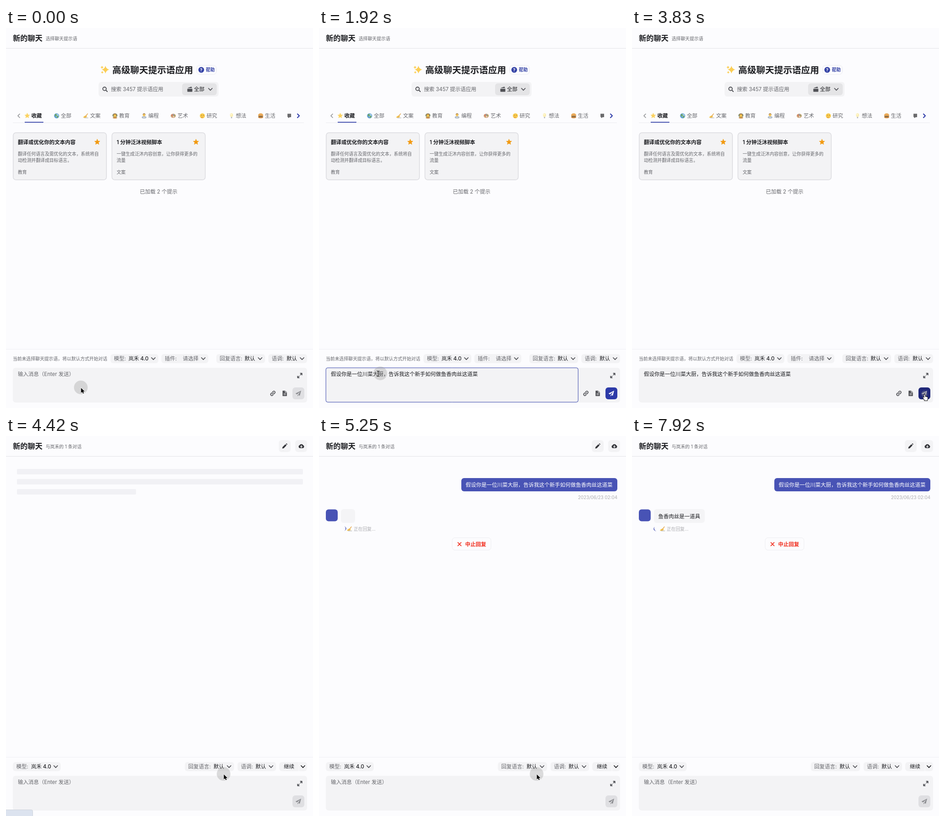
An HTML page with a canvas for the animation above (8000 ms loop, 673x831 px).

```html
<!DOCTYPE html>
<html lang="zh-CN">
<head>
<meta charset="utf-8">
<title>新的聊天</title>
<style>
html, body { margin: 0; width: 100%; height: 100%; overflow: hidden; background: #fcfcfe; }
canvas { display: block; width: 673px; height: 831px; }
</style>
</head>
<body>
<canvas id="stage"></canvas>
<script>
const W = 673, H = 831, LOOP = 8000, STEP = 1000 / 12;
const BG = '#fcfcfe', PANEL = '#f3f3f5', INK = '#1c1d21', GRAY = '#66676c', PALE = '#acacb0';
const BLUE = '#2c3aa8', INDIGO = '#4853b5', ICON = '#505156';
const BODY = 11.5, SMALL = 9.87;
const FONT = 'Inter, "Noto Sans CJK SC", "Noto Sans CJK", sans-serif';
const QUESTION = '假设你是一位川菜大厨，告诉我这个新手如何做鱼香肉丝这道菜';
const ANSWER = '鱼香肉丝是一道具';
const MODEL = '岚禾', INPUT_METHOD = '墨棠拼音', VIDEO_APP = '泛沐';

const canvas = document.getElementById('stage'), c = canvas.getContext('2d');
const dpr = window.devicePixelRatio || 1;
canvas.width = W * dpr;
canvas.height = H * dpr;

// Drawing helpers; text is centred vertically on y
function text(s, x, y, size = BODY, color = GRAY, weight = 400, align = 'left') {
  c.font = `${weight} ${size}px ${FONT}`;
  c.textAlign = align;
  c.fillStyle = color;
  c.fillText(s, x, y + size * 0.38);
}
function box(x, y, w, h, fill, r = 6, border, line = 1) {
  c.beginPath();
  c.roundRect(x, y, w, h, r);
  if (fill) { c.fillStyle = fill; c.fill(); }
  if (border) { c.strokeStyle = border; c.lineWidth = line; c.stroke(); }
}
function disc(x, y, rx, color, ry = rx) {
  c.beginPath();
  c.ellipse(x, y, rx, ry, 0, 0, 7);
  c.fillStyle = color;
  c.fill();
}
function shape(d, x, y, fill, stroke, width = 1.6, turn = 0) {
  const path = new Path2D(d);
  c.save();
  c.translate(x, y);
  c.rotate(turn);
  c.lineCap = c.lineJoin = 'round';
  c.lineWidth = width;
  if (stroke) { c.strokeStyle = stroke; c.stroke(path); }
  if (fill) { c.fillStyle = fill; c.fill(path); }
  c.restore();
}
const rule = (x, y, w, color) => { c.fillStyle = color; c.fillRect(x, y, w, 1); };
const chevron = (x, y, color = ICON) => shape('M-4 -2L0 2.2L4 -2', x, y, null, color, 1.8);
function star(x, y, r, color) {
  let d = '';
  for (let i = 0; i < 10; i++) {
    const a = i * Math.PI / 5, k = i % 2 ? r * 0.45 : r;
    d += `${i ? 'L' : 'M'}${k * Math.sin(a)} ${-k * Math.cos(a)}`;
  }
  shape(d + 'Z', x, y, color, color, 0.8);
}
function sparkle(x, y, r) {
  const q = r * 0.18;
  shape(`M0 ${-r}Q${q} ${-q} ${r} 0Q${q} ${q} 0 ${r}Q${-q} ${q} ${-r} 0Q${-q} ${-q} 0 ${-r}Z`, x, y, '#fbce55');
}
function pen(x, y) {
  shape('M-5.5 3Q-3 -1 1 -.5L3 2Q1 4.5 -5.5 4.2Z', x, y, '#f6cb58');
  shape('M-2 3L4 -4.5', x, y, null, '#e5a851', 1.5);
  shape('M-3 4.6H5', x, y, null, '#8a8a88', 0.7);
}

// Each tab emoji: ellipses as colour, dx, dy, rx, ry
const tabs = [
  ['全部', ['#5f9fd0', 0, 0, 5.6, 5.6], ['#9cc7e6', 1.2, -0.8, 3.4, 3.8], ['#6fa563', -1.8, -1.5, 2.2, 2.6], ['#6fa563', 2, 2, 1.8, 2.2]],
  ['文案'],
  ['教育', ['#8a9474', 0, -1, 5.6, 4.3], ['#a2703f', 0, -1.5, 3.2, 3.2], ['#f5c653', 0, -0.3, 2.7, 3], ['#c98f4a', 0, 4.3, 4.8, 1.7]],
  ['编程', ['#a37a4a', 0, -2.5, 2.9, 2.9], ['#f5c95f', 0, -1.4, 2.5, 2.7], ['#8fa6bd', 0, 3.5, 4.9, 2.4], ['#c9cdd2', 0, 3.5, 3.5, 2]],
  ['艺术', ['#cfa075', 0, 0, 5.6, 4.5], ['#d65f55', -2.6, -1.4, 1.2, 1.2], ['#5f98cf', 0.4, -2.4, 1.2, 1.2], ['#74ad69', 3, -0.6, 1.2, 1.2], ['#fcfcfe', 1, 2, 1.3, 1]],
  ['研究', ['#f9cc50', 0, 0, 5.6, 5.6], ['#8a602c', -2, -1.2, 0.7, 0.9], ['#8a602c', 2, -1.2, 0.7, 0.9], ['#e8ab45', -1, 3.4, 2.6, 1.3]],
  ['想法', ['#fbeeb2', 0, -1.6, 3.4, 3.9], ['#fef8da', -0.8, -2.4, 1.5, 1.7], ['#b5b5b6', 0, 3.8, 1.5, 1.6]],
  ['生活', ['#e9ab59', 0, -1.7, 5.5, 3.7], ['#dd9b4e', 0, 3.3, 5.3, 2.2], ['#d9654a', 0, 0.4, 5.5, 0.9], ['#83ad55', 0, 1.1, 5.6, 0.8], ['#8a5636', 0, 2.2, 5.2, 1]],
];

function selector(x, w, label, value, valueX, muted) {
  box(x, 713, w, 20, PANEL);
  text(label, x + 7.5, 723);
  text(value, valueX, 723, BODY, muted ? GRAY : INK, muted ? 400 : 500);
  chevron(x + w - 11, 723);
}

function card(x, title, lines, tag) {
  box(x + 0.75, 229, 204.5, 103, PANEL, 6, '#dcdce0', 1.5);
  text(title, x + 11, 249.5, BODY, INK, 600);
  star(x + 185, 249.5, 6.2, '#f29a11');
  lines.forEach((s, i) => text(s, x + 11, 275.5 + i * 13.3, SMALL));
  text(tag, x + 11, 315, SMALL);
}

function header(subtitle) {
  text('新的聊天', 15, 22, 16.3, INK, 600);
  text(subtitle, 87, 23, SMALL);
  rule(0, 44, W, '#e4e4e8');
  rule(0, 702, W, '#f0f0f4');
}

function homePage() {
  header('选择聊天提示语');
  sparkle(218, 91, 8.5);
  sparkle(210.5, 86, 3.4);
  sparkle(211, 97, 3);
  text('高级聊天提示语应用', 233, 91.5, 19.7, INK, 600);
  box(417.5, 81.5, 44, 20, BG, 7, '#ececf0');
  disc(428, 91.5, 6.3, '#3543a6');
  text('?', 428, 91.5, 9.5, '#fff', 700, 'center');
  text('帮助', 438, 91.5, SMALL, '#3543a6', 600);

  box(203, 118, 263, 32, PANEL);
  shape('M2.8 -1a3.8 3.8 0 1 1-7.6 0a3.8 3.8 0 1 1 7.6 0M1.9 2L5 5', 217, 134, null, ICON, 1.9);
  text('搜索 3457 提示语应用', 230, 134);
  box(386, 121, 76, 26, '#e4e4e6');
  shape('M-5.5 -1H5.5V4.5Q5.5 5.5 4.5 5.5H-4.5Q-5.5 5.5 -5.5 4.5ZM-5 -2.4L-3.5 -3.6L3.5 -5.8L5 -2.4Z', 403, 134, ICON);
  text('全部', 412, 134, BODY, INK, 500);
  chevron(448, 134);

  rule(15, 206.6, 638, '#eaeaef');
  shape('M2 -4L-2 0L2 4', 28, 192, null, '#88898d', 1.5);
  shape('M-2 -4L2 0L-2 4', 641, 192, null, BLUE, 2.1);
  star(46.5, 192, 5.6, '#fbd25f');
  text('收藏', 55.5, 192, BODY, INK, 600);
  box(41, 205.2, 41, 1.8, '#3644aa', 0);
  tabs.forEach(([name, ...blobs], i) => {
    const x = 111 + i * 63.9;
    if (!blobs.length) pen(x, 192);
    for (const [color, dx, dy, rx, ry] of blobs) disc(x + dx, 192 + dy, rx, color, ry);
    text(name, x + 9.3, 192);
  });
  shape('M-4 -4.5H4V3H1L-2 5L-3 2.5H-4Z', 621, 192, '#6b6b6d');

  card(15, '翻译或优化你的文本内容', ['翻译任何语言及需优化的文本，系统将自', '动检测并翻译成目标语言。'], '教育');
  card(231.5, `1 分钟${VIDEO_APP}视频脚本`, [`一键生成${VIDEO_APP}内容创意，让你获得更多的`, '流量'], '文案');
  text('已加载 2 个提示', 334.5, 358, BODY, GRAY, 400, 'center');

  text('当前未选择聊天提示语，将以默认方式开始对话', 15, 723, SMALL);
  selector(229, 105, '模型:', MODEL + ' 4.0', 268.5);
  selector(340.5, 103, '插件:', '请选择', 387.5, true);
  selector(461, 107, '回复语言:', '默认', 523);
  selector(575, 85, '语调:', '默认', 615);
}

function chatPage(t) {
  header(`与${MODEL}的 1 条对话`);
  box(598, 9, 26, 26, PANEL);
  shape('M-5.5 5.5L-4.7 2L1.5 -4L4 -1.5L-2 4.7ZM2.4 -4.9L3.5 -5.8Q4.3 -6 5 -5.2Q6 -4.2 5.5 -3.5L4.8 -2.5Z', 611, 22, '#34353a');
  box(634, 9, 26, 26, PANEL);
  shape('M-3.2 4.5a3.3 3.3 0 0 1-.6-6.4a4.2 4.2 0 0 1 7.6 0a3.3 3.3 0 0 1-.6 6.4Z', 647.5, 22, '#34353a');
  shape('M0 -1.5V2.6M-1.9 .9L0 2.8L1.9 .9', 647.5, 22, null, PANEL, 1.3);

  selector(15, 105, '模型:', MODEL + ' 4.0', 55);
  selector(392, 108, '回复语言:', '默认', 455);
  selector(507.5, 84.5, '语调:', '默认', 547);
  box(599, 713, 61, 20, PANEL);
  text('继续', 609, 723, BODY, INK, 500);
  box(641.5, 713, 1, 20, BG, 0);
  chevron(651, 723, INK);

  const shown = Math.min(1, Math.max(0, (t - 4550) / 320));
  c.globalAlpha = 1 - shown;
  if (shown < 1) [627, 627, 261].forEach((w, i) => box(24, 72 + i * 22, w, 12, '#f1f1f5', 2));
  c.globalAlpha = shown;
  messages(t);
  c.globalAlpha = 1;
}

function messages(t) {
  box(312, 92, 342, 29, INDIGO);
  text(QUESTION, 321.5, 106.5, BODY, '#fff');
  text('2023/06/23 02:04', 654, 134, SMALL, PALE, 400, 'right');

  box(15, 160.5, 26, 26, INDIGO);
  const count = Math.max(0, Math.min(ANSWER.length, 2 * Math.floor((t - 7580) / STEP)));
  box(48, 160, count ? 19.5 + count * BODY : 31, 30, '#f4f4f6');
  text(ANSWER.slice(0, count), 57.5, 175.5, BODY, INK);

  const angle = (t / 600 + 0.25) * 2 * Math.PI;
  c.strokeStyle = '#3f4ab0';
  c.lineCap = 'butt';
  for (let i = -3; i <= 3; i++) {
    c.lineWidth = 1.7 - Math.abs(i) * 0.4;
    c.beginPath();
    c.arc(53.5, 202.5, 5.4, angle + i * 0.3 - 0.16, angle + i * 0.3 + 0.16);
    c.stroke();
  }
  pen(67, 203);
  text('正在回复...', 76, 203, SMALL, PALE);

  box(292, 222.5, 85, 27, BG, 6, '#ededf1');
  shape('M-3.6 -3.6L3.6 3.6M3.6 -3.6L-3.6 3.6', 308, 236.5, null, '#f12d1d', 1.5);
  text('中止回复', 320.5, 236.5, BODY, '#f12d1d', 600);
}

function composer(t, home) {
  const filled = home && t >= 1490;
  box(15, 743, 645, 76, PANEL);
  text(filled ? QUESTION : '输入消息（Enter 发送）', 26, 757, BODY, filled ? INK : GRAY);
  if (t >= 990 && t < 3740) {
    box(15.1, 743.1, 553, 75.1, null, 4, '#3644aa');
    if (t < 1490 || Math.floor((t - 1400) / 500) % 2 === 0) box(filled ? 348 : 25.5, 750, 1, 13, INK, 0);
  }
  shape('M1.3 -4.8H4.8V-1.3M4.5 -4.5L1.4 -1.4M-1.3 4.8H-4.8V1.3M-4.5 4.5L-1.4 1.4', 644, 760, null, ICON, 1.7);
  if (home) {
    shape('M-1 -2.6H-3.2a2.6 2.6 0 0 0 0 5.2H-1M1 -2.6H3.2a2.6 2.6 0 0 1 0 5.2H1M-2.2 0H2.2', 585, 799, null, ICON, 1.6, -Math.PI / 4);
    shape('M-4 -5.5H1L4.3 -2.2V5.5H-4Z', 611, 799, ICON, ICON, 0.8);
    shape('M1 -5V-2H4M-2 .6H2.2M-2 3H2.2', 611, 799, null, PANEL, 1);
  }
  const pressed = t >= 3740 && t < 3990;
  box(628, 786, 26, 26, !filled ? '#dfdfe2' : pressed ? '#202878' : t > 2990 ? '#26339a' : BLUE);
  shape('M6 -6L-6.5 .3L-3 2.2L3.8 -3.8L-.6 3.2L3 5.2ZM-2 3.3V6.3L0 4.3Z', 641, 799, !filled ? '#8c8d91' : pressed ? '#b5b6c2' : '#fff');
}

function inputMethodTag(x, y) {
  box(x - 8.5, y - 9.5, 66, 19, '#fff', 3, '#e4e4e8');
  box(x - 6.5, y - 6.5, 13, 13, '#000', 3);
  text(INPUT_METHOD, x + 11, y, 10.5, '#000', 500);
}

// Pointer path: time, x, y
const track = [
  [0, 164, 786], [500, 164, 786], [850, 104, 774], [1330, 104, 774], [1670, 129, 755],
  [1900, 129, 755], [2170, 606, 778], [2420, 488, 795], [2667, 488, 797], [2750, 545, 797],
  [3080, 641, 800], [3920, 641, 800], [4250, 477, 739], [5850, 477, 739], [5920, 530, 739],
  [6120, 715, 739], [LOOP, 715, 739],
];
function pointerAt(t) {
  const i = Math.max(1, track.findIndex(k => k[0] > t));
  const [t0, x0, y0] = track[i - 1], [t1, x1, y1] = track[i];
  const u = Math.max(0, (t - t0) / (t1 - t0)), e = u * u * (3 - 2 * u);
  return [x0 + (x1 - x0) * e, y0 + (y1 - y0) * e];
}
function pointer(t) {
  const [hx, hy] = pointerAt(t), [x, y] = pointerAt(t - STEP);
  const halo = 'rgba(150,150,150,.32)';
  const pressing = t >= 3740 && t < 3910;
  disc(hx, hy, pressing ? 7 : 15, halo);
  if (t > 980 && t < 1160) disc(hx, hy, 7.5, halo);

  if (t < 660 || t >= 3990) {
    shape('M0 0V11L2.6 8.8L4.4 12.6L6.2 11.8L4.5 8H8Z', x + 0.5, y + 1, '#000', '#fff', 1.6);
  } else if (x < 568) {
    const beam = 'M-3 -6Q0 -6 0 -4.5V4.5Q0 6 -3 6M3 -6Q0 -6 0 -4.5M0 4.5Q0 6 3 6';
    shape(beam, x + 0.5, y + 1, null, '#fff', 2.4);
    shape(beam, x + 0.5, y + 1, null, '#000', 1.2);
  } else {
    shape('M-2.5 -6q1 -1 2 0V-1.5Q1 -2.5 2 -1.2Q3 -2 3.8 -.8Q5.5 -1 5.3 1L4.5 4.5V6.5H-2V4.5L-5.5 .5Q-5 -1 -3.5 0L-2.5 1Z', x + 2, y + 8, '#fff', '#000', 1.8);
  }
}

function draw(now) {
  // The picture advances twelve times a second
  const t = Math.floor((now % LOOP + 4) / STEP) * STEP % LOOP;
  const home = t < 4320;
  c.setTransform(dpr, 0, 0, dpr, 0, 0);
  c.fillStyle = BG;
  c.fillRect(0, 0, W, H);
  home ? homePage() : chatPage(t);
  composer(t, home);
  if (t >= 990 && t < 1320) inputMethodTag(182.5, 805.5);
  if (t >= 4570 && t < 5240) inputMethodTag(503.5, 760);
  if (t >= 4400 && t < 4990) box(-4, 817.5, 62.5, 20, '#dce3ef', 3, '#cdd2da');
  pointer(t);
  requestAnimationFrame(draw);
}
requestAnimationFrame(draw);
</script>
</body>
</html>
```
